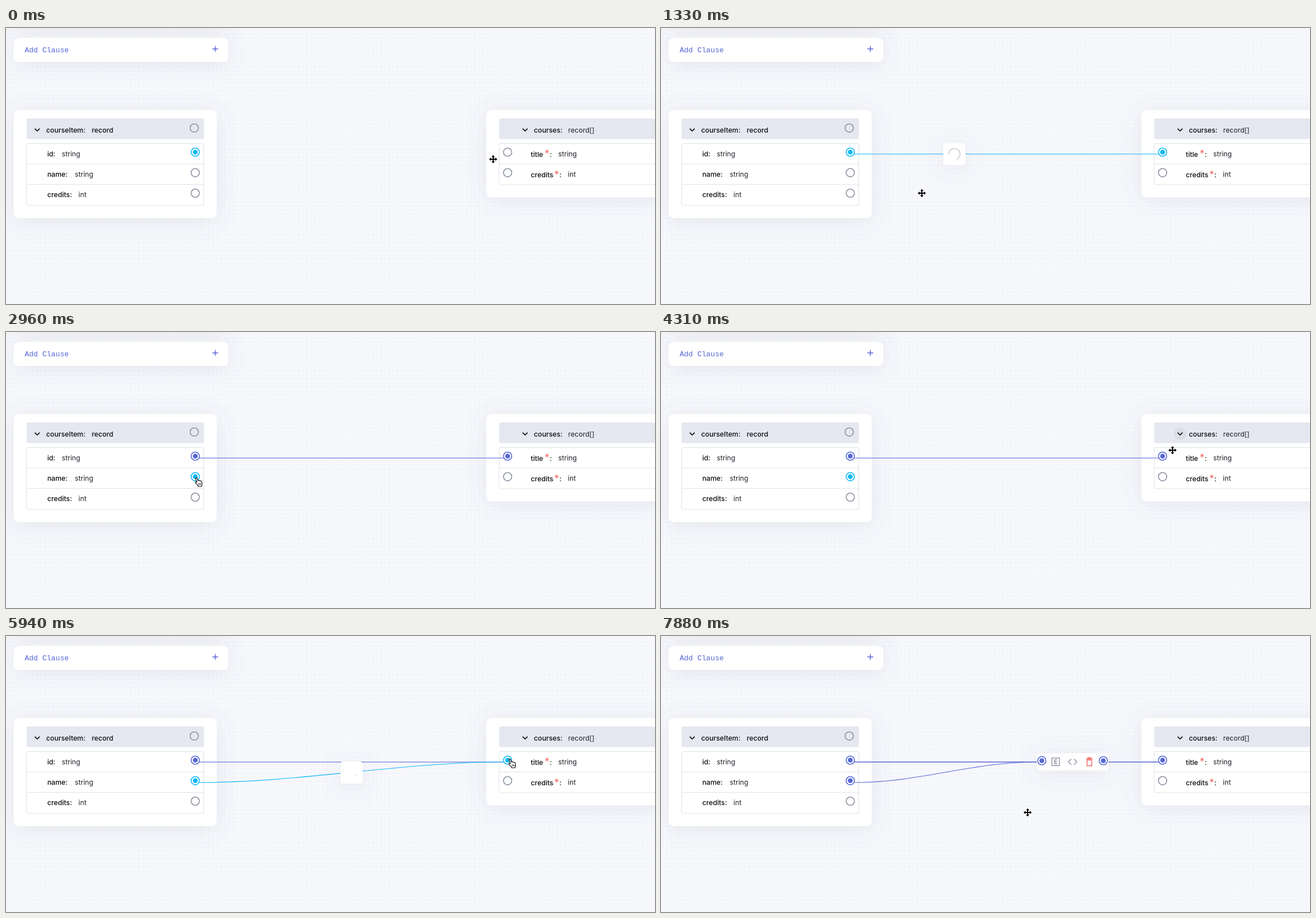
These frames come from a looping animation (1147x488 px, 8000 ms). An HTML page:

```html
<!DOCTYPE html>
<html lang="en">
<head>
<meta charset="utf-8">
<title>Data mapper</title>
<style>
html, body { margin: 0; width: 100%; height: 100%; overflow: hidden; background: #f7f8fc; }
svg { display: block; width: 1147px; height: 488px; }
text { font: 400 12.2px Inter, sans-serif; fill: #1d2028; white-space: pre; }
.label { font-weight: 500; fill: #0c0d12; }
.star { font-size: 17px; fill: #f4645f; }
.mono { font: 13px "Liberation Mono", monospace; fill: #5567d5; }
.box { fill: #fff; stroke: #dfe2eb; }
.head { fill: #e5e8f0; }
.line { fill: none; stroke-width: 1.4; }
</style>
</head>
<body>
<svg id="stage" viewBox="0 0 1147 488">
  <defs>
    <pattern id="dots" width="7.24" height="7.24" patternUnits="userSpaceOnUse">
      <circle cx="3.6" cy="3.6" r=".55" fill="#cdd1de"/>
    </pattern>
    <filter id="shade" filterUnits="userSpaceOnUse" x="-100" y="-150" width="1500" height="700">
      <feDropShadow dx="0" dy="5" stdDeviation="19" flood-color="#666a85" flood-opacity=".13"/>
    </filter>
  </defs>
  <rect width="1147" height="488" fill="url(#dots)"/>
  <g id="cards"></g>
  <g id="links"></g>
  <g id="ports"></g>
  <g id="loader">
    <rect x="-19.5" y="-19.5" width="39" height="39" rx="5" fill="#fff" filter="url(#shade)"/>
    <path id="arc" fill="none" stroke="#b9bac6" stroke-width="1.1"/>
  </g>
  <g id="node"></g>
  <g id="move">
    <path d="M0-7.2 3-3.8H1V-1H3.8V-3L7.2 0 3.8 3V1H1V3.8H3L0 7.2-3 3.8H-1V1H-3.8V3L-7.2 0-3.8-3V-1H-1V-3.8H-3Z"
      fill="#000" stroke="#fff" stroke-width="1.2" paint-order="stroke"/>
  </g>
  <g id="hand">
    <path d="M-1.6 1.2C-2-.6.4-1 .9.7L2.3 5C2.9 3.8 4.4 4 4.7 5.2 5.4 4.4 6.7 4.6 7 5.8 7.9 5.2 9 5.8 9.2 7
      L9.6 9.6C9.8 11 9.1 12 8.9 13.2V15H2.6L2.2 13.4C.7 12-.8 10.4-2.2 8.6-3.1 7.3-1.6 6.4-.5 7.4L.3 8Z"
      fill="#fff" stroke="#000" stroke-width="1.1" stroke-linejoin="round"/>
    <path d="M3.6 9.4V12.4M5.5 9.2V12.4M7.3 9.2V12.2" stroke="#000" stroke-width=".8"/>
  </g>
</svg>
<script>
const LOOP = 8000, TICK = 148.6;
const CYAN = '#10b9f7', BLUE = '#5567d5', GREY = '#8d91a3';
const $ = id => document.getElementById(id);

const rect = (x, y, w, h, attrs) => `<rect x="${x}" y="${y}" width="${w}" height="${h}" ${attrs}/>`;
const text = (x, y, s, cls = '') => `<text x="${x}" y="${y}" class="${cls}">${s}</text>`;
const panel = (x, y, w, h) => rect(x, y, w, h, 'rx="9" fill="#fff" filter="url(#shade)"');
const chevron = x => `<path d="M${x - 4.3} 177.8l4.3 4.3 4.3-4.3" fill="none" stroke="#111" stroke-width="1.7"/>`;
const rule = (x, y, w) => `<path d="M${x} ${y}h${w}" stroke="#dfe2eb"/>`;
const line = (d, color, extra = '') => `<path class="line" d="${d}" stroke="${color}" ${extra}/>`;

function port(x, y, color) {
  const dot = color === GREY ? '' : `<circle cx="${x}" cy="${y}" r="4.3" fill="${color}"/>`;
  return `<circle cx="${x}" cy="${y}" r="7.3" fill="${dot ? '#fff' : 'none'}" stroke="${color}" stroke-width="1.6"/>${dot}`;
}

$('cards').innerHTML =
  panel(13.5, -70, 379.5, 62) + panel(13.5, 17.5, 379.5, 42.5) +
  panel(13.5, 145, 359, 191) + panel(849, 145, 400, 154.5) +
  text(33, 43, 'Add Clause', 'mono') +
  `<path d="M364.7 37h10.4M369.9 31.8v10.4" stroke="${BLUE}" stroke-width="1.4"/>` +
  rect(36.5, 160, 313.5, 36.5, 'rx="2" class="head"') + rect(36.5, 204.5, 313, 109, 'rx="2" class="box"') +
  rule(36.5, 240.5, 313) + rule(36.5, 276.5, 313) +
  rect(871.5, 160, 350, 36.5, 'rx="2" class="head"') + rect(871.5, 204.5, 350, 72.5, 'rx="2" class="box"') +
  rule(871.5, 240.5, 350) +
  '<circle id="hover" cx="917.5" cy="180" r="11" fill="#dcdee5"/>' +
  chevron(55.2) + chevron(917.4) +
  text(71, 184.5, 'courseItem:', 'label') + text(151.5, 184.5, 'record', 'label') +
  text(73, 227.3, 'id:', 'label') + text(98.5, 227.3, 'string') +
  text(73, 263.3, 'name:', 'label') + text(121.5, 263.3, 'string') +
  text(73, 299.3, 'credits:', 'label') + text(128, 299.3, 'int') +
  text(933, 184.5, 'courses:', 'label') + text(993.5, 184.5, 'record[]') +
  text(927.5, 227.8, 'title', 'label') + text(952, 228, '*', 'star') +
  text(961, 227.8, ':', 'label') + text(976, 227.3, 'string') +
  text(927.5, 263.8, 'credits', 'label') + text(969, 264.5, '*', 'star') +
  text(978, 263.8, ':', 'label') + text(993, 263.3, 'int');

$('node').innerHTML =
  rect(664, 207.5, 127, 30, 'rx="6" fill="#fff" filter="url(#shade)"') +
  port(673, 220.5, BLUE) + port(781.7, 220.5, BLUE) +
  `<g fill="none" stroke="${GREY}" stroke-width="1.4">
    <rect x="690.7" y="215.7" width="13.6" height="13.6"/>
    <path d="M700.2 219h-4.4v7h4.4M695.8 222.5h4"/>
    <path d="M725 217.6l-5 5 5 5M730 217.6l5 5-5 5"/></g>
  <path d="M751.5 217.3h11.2M754.6 217v-1.7h5v1.7M752.9 219.3v10.2h8.4v-10.2z" fill="none" stroke="#f2645c" stroke-width="1.4"/>`;

// pointer stops: tick, x, y
const STOPS = [
  [0, 861, 232], [1, 867, 239], [3, 884, 228], [4, 884, 219], [6, 884, 219],
  [7, 760, 245], [8, 590, 275], [9, 461, 292], [11, 352, 284], [13, 318, 272],
  [14, 322, 270], [17, 337, 258], [22, 337, 258], [23, 470, 215], [24, 760, 160],
  [25, 947, 140], [26, 931, 168], [27, 931, 168], [28, 915, 190], [29, 904, 209],
  [31, 890, 221], [33, 890, 221], [35, 891, 218], [40, 891, 218], [41, 868, 240],
  [43, 770, 285], [45, 680, 305], [47, 648, 312], [54, 648, 312]
];

function pointerAt(n) {
  const i = Math.max(1, STOPS.findIndex(s => s[0] >= n));
  const [a, x, y] = STOPS[i - 1], [b, u, v] = STOPS[i];
  const k = (n - a) / (b - a);
  return [x + (u - x) * k, y + (v - y) * k];
}

const within = (n, a, b) => n >= a && n <= b;
const show = (id, on) => $(id).setAttribute('display', on ? 'inline' : 'none');
const place = (id, x, y) => $(id).setAttribute('transform', `translate(${x} ${y})`);
const ease = k => k * k * (3 - 2 * k);

// indeterminate ring: the dash grows, then its tail catches up, while the whole ring turns
function arcPath(ms) {
  const p = ms / 1400 % 1, size = 126.9, r = 10;
  const grow = ease(Math.min(1, p * 2)), chase = ease(Math.max(0, p * 2 - 1));
  const from = 15 * grow + 110 * chase;
  const to = Math.min(size, from + 1 + 99 * grow);
  const at = d => {
    const a = (d / size + p) * 2 * Math.PI;
    return `${(r * Math.cos(a)).toFixed(2)} ${(r * Math.sin(a)).toFixed(2)}`;
  };
  return `M${at(from)}A${r} ${r} 0 ${to - from > size / 2 ? 1 : 0} 1 ${at(to)}`;
}

function draw(t) {
  const n = Math.min(53, Math.floor((t + 16) / TICK));
  const done = n >= 51, saved = n >= 17;

  const id = saved ? BLUE : CYAN;
  const name = n < 16 ? GREY : done ? BLUE : CYAN;
  const title = n < 4 ? GREY : within(n, 17, 30) || done ? BLUE : CYAN;
  $('ports').innerHTML =
    port(332.7, 176.8, GREY) + port(334.5, 219.5, id) + port(334.5, 255.8, name) +
    port(334.5, 292, GREY) + port(886.5, 219.5, title) + port(886.5, 255.8, GREY);

  let links = '';
  if (done) {
    links = line('M342 222.8H666', BLUE) + line('M789 222.8H879', BLUE) +
      line('M342 259C460 259 545 222.8 666 222.8', BLUE, 'style="stroke-width:1.1"');
  } else if (n >= 6) {
    links = line('M342 222.9H879', id, 'opacity=".85"');
    if (n >= 40) links += line('M342 259C521 259 700 222.8 879 222.8', CYAN, 'style="stroke-width:1.1"');
  }
  $('links').innerHTML = links;

  const first = within(n, 6, 16), second = within(n, 40, 50);
  show('loader', first || second);
  if (first) place('loader', 518.5, 223);
  if (second) place('loader', 610.5, 241.3);
  if (first || second) $('arc').setAttribute('d', arcPath(n * TICK - 7 - (first ? 785 : 5856)));

  show('node', done);
  show('hover', within(n, 28, 29));

  const hand = within(n, 4, 6) || within(n, 16, 22) || within(n, 31, 40);
  show('hand', hand);
  show('move', !hand);
  place(hand ? 'hand' : 'move', ...pointerAt(n));
}

const start = performance.now();
function loop() {
  draw((performance.now() - start) % LOOP);
  requestAnimationFrame(loop);
}
loop();
</script>
</body>
</html>
```
